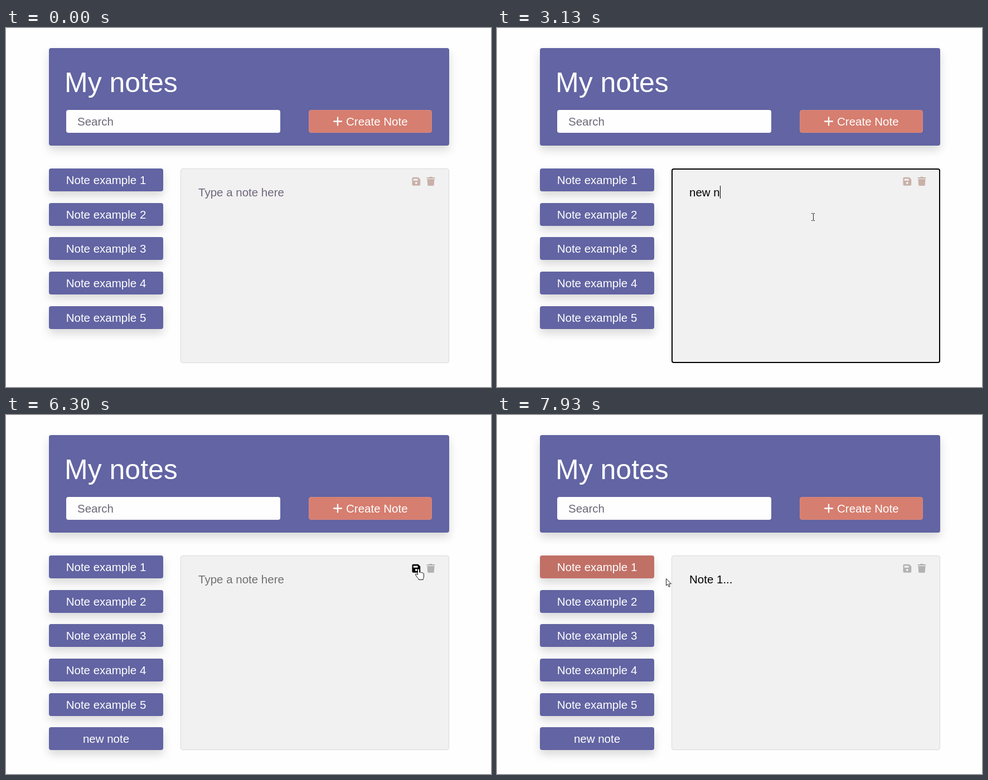
Recreate the animation shown at these times as an HTML page. Size 870 by 644 pixels, loop 8 s.

```html
<!DOCTYPE html>
<html lang="en">
<head>
<meta charset="utf-8">
<title>My notes</title>
<style>
html, body { margin: 0; width: 100%; height: 100%; overflow: hidden; background: #fefefe; }
body { position: relative; font: 20.5px/23px "Liberation Sans", Arial, sans-serif; }
body > * { position: absolute; box-sizing: border-box; white-space: pre; }
.card { border-radius: 4px; background: #6264a3; color: #fff; box-shadow: 0 8px 16px rgba(0, 0, 0, .15); }
.header { left: 77px; top: 36px; width: 718px; height: 175px; }
h1 { left: 105px; top: 70px; margin: 0; font-size: 50px; line-height: 56px; font-weight: 400; color: #fff; }
.search { left: 107.5px; top: 147px; width: 384px; height: 41px; padding-left: 20.5px; line-height: 41px;
  border-radius: 4px; background: #fefefe; color: #6c6878; }
.create { left: 543px; top: 147px; width: 221px; height: 41px; padding-left: 66px; line-height: 39px;
  border: 1px solid #d98a80; border-radius: 4px; background: #d67e70; color: #fff; }
.item { left: 77px; width: 205px; height: 41px; line-height: 41px; text-align: center; }
#editor { left: 313px; top: 252px; width: 482px; height: 349px; border: 1px solid #d9d9d9;
  border-radius: 4px; background: #f1f1f1; }
#editor.focus { border: 2px solid #000; }
#hint, #entry { left: 345px; top: 283px; }
#entry { color: #000; }
#caret { position: absolute; width: 1px; height: 23px; background: #000; }
svg { left: 0; top: 0; }
</style>
</head>
<body>
<div class="card header"></div>
<h1>My notes</h1>
<div class="search">Search</div>
<div class="create">Create Note</div>
<div id="editor"></div>
<div id="hint">Type a note here</div>
<div id="entry"><span id="text"></span><i id="caret"></i></div>
<svg width="870" height="644">
  <path d="M595 160.5v14M588 167.5h14" stroke="#fff" stroke-width="2.3" stroke-linecap="round"/>
  <path id="save" fill-rule="evenodd" transform="translate(728.5 267.7)"
    d="M2 0H10.8L14.7 3.9V13a2 2 0 0 1-2 2H2a2 2 0 0 1-2-2V2a2 2 0 0 1 2-2zM2.2 2.7v3.4h8V2.7zM7.3 8.3a2 2 0 1 0 .01 0z"/>
  <path id="trash" transform="translate(754.5 267)"
    d="M5 0H10L10.6 1H14.2Q15 1 15 2T14.2 3H.8Q0 3 0 2T.8 1H4.4zM1 4H14L13.3 14.6Q13.2 16 11.8 16H3.2Q1.8 16 1.7 14.6z"/>
  <g id="cursor" stroke-linejoin="round">
    <path id="beam" fill="none" stroke="#222" d="M-3-6.5H-1L0-5.5 1-6.5H3M.5-5.5V5.5M-3 6.5H-1L0 5.5 1 6.5H3"/>
    <path id="hand" fill="#fff" stroke="#111"
      d="M-1.6 11V1.6a1.6 1.6 0 0 1 3.2 0V6.5c.6-1 2.8-.8 3 .5c.8-.8 2.6-.4 2.7.8c1-.5 2.2 0 2.2 1.3V14c0 2-1.5 3-1.5 5.5H.5C0 17-4 13.5-5.2 11c-.8-1.6 1-2.6 2.2-1.4z"/>
    <path id="arrow" fill="#fff" stroke="#222" d="M.5.5V13L3.3 10.5 5.3 15.3 7.3 14.4 5.4 9.8H9.5z"/>
  </g>
</svg>
<script>
const LOOP = 8000, FOCUS = 1000, SAVED = 5700, OPENED = 7390, BLINK = 535;
const $ = id => document.getElementById(id);

const typedAt = [1930, 2060, 2250, 2400, 2600, 3200, 3530, 3730];

// [time, x, y] of the pointer's hot spot
const route = [
  [470, 640, 560], [930, 567, 339], [4545, 567, 339], [5300, 741, 277], [5500, 741.5, 275.5],
  [5699, 741.5, 275.5], [5700, 744, 265], [5899, 744, 265], [5900, 742, 266], [6240, 742, 266],
  [6300, 740.5, 276], [6540, 560, 312], [6800, 270, 394], [6930, 180, 380], [7070, 112, 279],
  [7200, 110, 277], [7420, 110, 277], [7930, 303, 293]
];

const items = [1, 2, 3, 4, 5].map(n => "Note example " + n).concat("new note").map((label, i) => {
  const el = document.createElement("div");
  el.className = "card item";
  el.textContent = label;
  el.style.top = 252 + i * 61.65 + "px";
  document.body.insertBefore(el, $("editor"));
  return el;
});

function pointerAt(t) {
  const next = route.findIndex(k => k[0] > t);
  if (next < 0) return route[route.length - 1].slice(1);
  const [t0, x0, y0] = route[Math.max(next - 1, 0)], [t1, x1, y1] = route[next];
  const u = Math.max(0, (t - t0) / (t1 - t0));
  return [x0 + (x1 - x0) * u, y0 + (y1 - y0) * u];
}

const inside = (x, y, left, top, w, h) => x >= left && x < left + w && y >= top && y < top + h;
const show = (id, on) => $(id).style.display = on ? "" : "none";

function draw(t) {
  const saved = t >= SAVED, opened = t >= OPENED;
  const focused = t >= FOCUS && !saved;
  const keys = typedAt.filter(k => k <= t);
  const text = opened ? "Note 1..." : saved ? "" : "new note".slice(0, keys.length);
  const lastKey = keys.length ? keys[keys.length - 1] : FOCUS;

  $("editor").className = focused ? "focus" : "";
  $("text").textContent = text;
  show("hint", !text);
  $("hint").style.color = saved ? "#707070" : "#6f667c";
  show("caret", focused && Math.floor((t - lastKey) / BLINK) % 2 === 0);

  const [x, y] = pointerAt(t);
  const visible = t >= 470;
  const onSave = visible && inside(x, y, 726, 264, 20, 21);
  const onTrash = visible && inside(x, y, 752, 264, 20, 21);
  const hovered = items.findIndex((el, i) => visible && inside(x, y, 77, 252 + i * 61.65, 205, 41));

  const idle = t < 5230 ? "#c9b0a8" : "#b2b2b2";
  $("save").style.fill = onSave && !(saved && t < 5900) ? "#000" : idle;
  $("trash").style.fill = onTrash ? "#000" : idle;
  items.forEach((el, i) => {
    el.style.background = opened && i === 0 ? "#c17066" : i === hovered ? "#585894" : "#6264a3";
  });
  items[5].style.display = saved ? "" : "none";

  const kind = onSave || onTrash || hovered >= 0 ? "hand"
    : inside(x, y, 313, 252, 482, 349) ? "beam" : "arrow";
  ["beam", "hand", "arrow"].forEach(id => show(id, id === kind));
  show("cursor", visible);
  $("cursor").setAttribute("transform", `translate(${Math.round(x)} ${Math.round(y)})`);
}

const start = performance.now();
function frame() {
  draw((performance.now() - start) % LOOP);
  requestAnimationFrame(frame);
}
frame();
</script>
</body>
</html>
```
